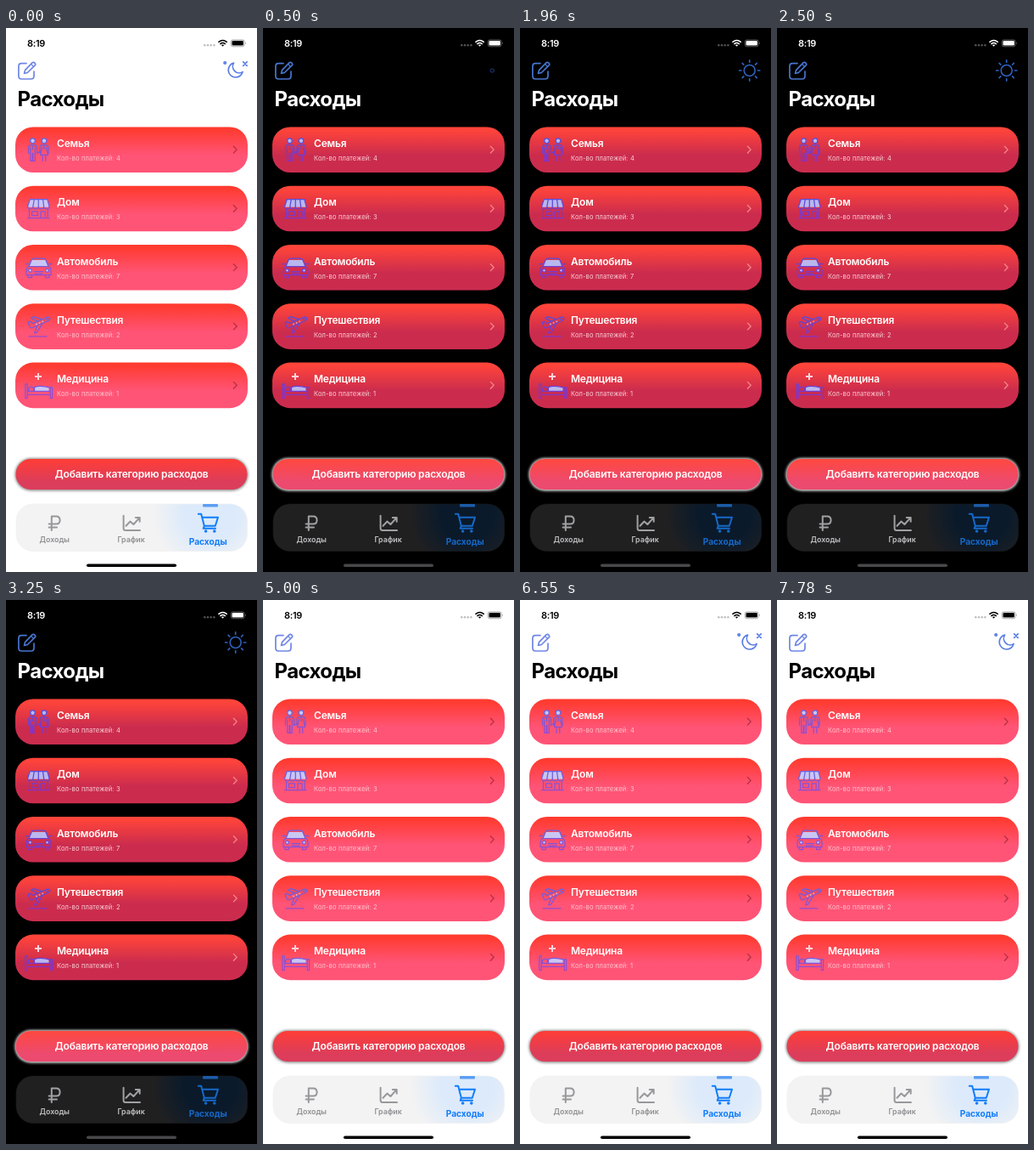
Recreate the animation shown at these times as an HTML page. Size 296x640 px, loop 7.84 s.

```html
<!DOCTYPE html>
<html lang="ru">
<head>
<meta charset="utf-8">
<title>Расходы</title>
<style>
html, body { margin: 0; width: 100%; height: 100%; overflow: hidden; }
svg { display: block; width: 296px; height: 640px; font-family: Inter, "Noto Sans", sans-serif; }
.light {
  --bg: #fff; --fg: #000; --faint: #bdbdbf; --home: #000; --edit: #6f86e6;
  --top: #ff3b30; --low: #ff5476; --chev: #b52f49; --sub: #ffc4cc;
  --btnTop: #ff3d36; --btnLow: #dc3d5b; --glow: #8d8d8d;
  --barA: #f3f3f3; --barB: #dceafb; --edge: #eeeef0; --tab: #98989c; --label: #8f8f93;
  --active: #117dfb; --mark: #5c9ef3;
  --inkA: #5867e8; --inkB: #9a48cf; --pale: #c9c6f4; --tone: #5a7ee6;
}
.dark {
  --bg: #000; --fg: #fff; --faint: #555558; --home: #48484b; --edit: #4776cf;
  --top: #ff443a; --low: #cb2c4e; --chev: #f6858d; --sub: #fbd0d6;
  --btnTop: #ff483f; --btnLow: #ec4a6f; --glow: #e9e9e9;
  --barA: #202021; --barB: #0a1a2b; --edge: #1c1c1e; --tab: #a1a1a4; --label: #c2c2c5;
  --active: #1668c8; --mark: #1c5ca8;
  --inkA: #4b50e4; --inkB: #8b2fc4; --pale: #b9b7ee; --tone: #2f60bd;
}
.fg { fill: var(--fg); }
.line { fill: none; stroke-linecap: round; stroke-linejoin: round; }
.ink { stroke: url(#ink); stroke-width: 1.25; }
.pale { fill: var(--pale); }
.name { font-size: 12px; font-weight: 600; letter-spacing: -.2px; fill: #fff; }
.sub { font-size: 7.5px; letter-spacing: .15px; fill: var(--sub); }
.tab { font-size: 8.8px; font-weight: 600; fill: var(--label); text-anchor: middle; }
.tone { stroke: var(--tone); stroke-width: 1.7; }
</style>
</head>
<body>
<svg id="stage" class="light" viewBox="0 0 296 640">
  <defs>
    <linearGradient id="card" x2="0" y2="1">
      <stop offset=".06" style="stop-color:var(--top)"/>
      <stop offset=".62" style="stop-color:var(--low)"/>
    </linearGradient>
    <linearGradient id="btn" x2="0" y2="1">
      <stop offset="0" style="stop-color:var(--btnTop)"/>
      <stop offset=".75" style="stop-color:var(--btnLow)"/>
    </linearGradient>
    <linearGradient id="ink" gradientUnits="userSpaceOnUse" x1="0" y1="12" x2="0" y2="42">
      <stop offset="0" style="stop-color:var(--inkA)"/>
      <stop offset="1" style="stop-color:var(--inkB)"/>
    </linearGradient>
    <radialGradient id="bar" gradientUnits="userSpaceOnUse" cx="241" cy="572" r="68">
      <stop offset="0" style="stop-color:var(--barB)"/>
      <stop offset=".45" style="stop-color:var(--barB)"/>
      <stop offset="1" style="stop-color:var(--barA)"/>
    </radialGradient>
    <filter id="blur" x="-10%" y="-40%" width="120%" height="180%">
      <feGaussianBlur stdDeviation="1.8"/>
    </filter>
  </defs>

  <rect width="296" height="640" style="fill:var(--bg)"/>

  <g class="fg">
    <text x="25" y="21.8" font-size="11" font-weight="600" letter-spacing="-.3">8:19</text>
    <g id="dots" style="fill:var(--faint)"></g>
    <path class="line" d="M251 16.4Q255.6 12.6 260.2 16.4M252.9 18.6Q255.6 16.5 258.3 18.6"
      style="stroke:var(--fg)" stroke-width="1.6" stroke-linecap="butt"/>
    <path d="M253.9 20Q255.6 18.8 257.3 20L255.6 21.8Z"/>
    <rect x="265.3" y="13.9" width="15.8" height="7.9" rx="2.4" fill="none" stroke-width=".7"
      style="stroke:var(--fg)" opacity=".5"/>
    <rect x="266.5" y="15.1" width="13.4" height="5.5" rx="1.4"/>
    <path d="M282 16.5Q283.4 17.8 282 19.2Z" opacity=".5"/>
  </g>

  <g class="line" style="stroke:var(--edit)" stroke-width="1.7">
    <path d="M24 41.6H18.2Q14.9 41.6 14.9 45V56.6Q14.9 60 18.2 60H29.6Q33 60 33 56.6V51"/>
    <path d="M21.5 53.5L22.5 49.6L31.2 40.7Q32.4 39.7 33.9 41.1Q35.3 42.6 34.2 43.8L25.4 52.5Z"/>
    <path d="M29.6 42.5L32.5 45.4" stroke-width="1.2"/>
  </g>
  <text class="fg" x="13.5" y="91.8" font-size="24" font-weight="700" letter-spacing="-.6">Расходы</text>

  <g id="sun" class="line tone"></g>
  <g id="moon" class="line tone">
    <path id="crescent" d="M268.6 41.1A8.6 8.6 0 1 0 279.1 51.6A7.6 7.6 0 0 1 268.6 41.1Z"/>
    <circle id="dot" cx="258.2" cy="41" r="1.2"/>
    <path id="cross" d="M279.7 39.9L284.2 44.3M284.2 39.9L279.7 44.3"/>
  </g>

  <g id="cards"></g>

  <rect x="10.5" y="506" width="275" height="38.5" rx="19" style="fill:var(--glow)" filter="url(#blur)"/>
  <rect x="11.5" y="507" width="273" height="36" rx="18" fill="url(#btn)"/>
  <text class="name" x="148" y="529.2" text-anchor="middle" style="letter-spacing:-.18px">Добавить категорию расходов</text>

  <rect x="12" y="560" width="272.5" height="55.5" rx="20" fill="url(#bar)" style="stroke:var(--edge)" stroke-width=".6"/>
  <rect x="232" y="560" width="18" height="3.4" rx="1" style="fill:var(--mark)"/>
  <g class="line" style="stroke:var(--tab)" stroke-width="2">
    <path d="M53.8 591V574.4H59.2Q63.6 574.4 63.6 579Q63.6 583.6 59.2 583.6H50.6M50.6 587.4H60"/>
    <path d="M138.6 573.8V588.4Q138.6 590.9 141 590.9H158M141.5 585.7L146.5 580.5L150.4 584L157.2 576.4M152.8 575.9H157.7V580.8"/>
  </g>
  <g class="line" style="stroke:var(--active)" stroke-width="2">
    <path d="M226.8 571.8H230.2L233.8 585.8H246.8L250 575.8H231.3M233.8 585.8L232.7 588.8H247"/>
    <g style="fill:var(--active)" stroke="none">
      <circle cx="235.6" cy="592" r="1.8"/><circle cx="245.8" cy="592" r="1.8"/>
    </g>
  </g>
  <text class="tab" x="57.3" y="605.2">Доходы</text>
  <text class="tab" x="147.6" y="605.2">График</text>
  <text class="tab" x="238.2" y="607.8" style="fill:var(--active);font-size:10.2px;font-weight:700">Расходы</text>
  <rect x="95" y="630.4" width="106" height="3.6" rx="1.8" style="fill:var(--home)"/>
</svg>

<script>
const LOOP = 7840, DARK_AT = 500, LIGHT_AT = 5000;
const $ = id => document.getElementById(id);
const range = n => [...Array(n).keys()];

// Icons are drawn from the left edge and top of their card.
const person = (x, skirt) => `
  <circle class="pale" cx="${x}" cy="16.3" r="2.8"/>
  <path d="M${x - 5} 31V25Q${x - 5} 21.2 ${x - 2} 21.2H${x + 2}Q${x + 5} 21.2 ${x + 5} 25V31
    M${x} 21.5V26
    ${skirt ? `M${x - 2.5} 24L${x - 4.5} 33H${x + 4.5}L${x + 2.5} 24M${x - 1.8} 33V40M${x + 1.8} 33V40`
            : `M${x - 2.8} 24.5V40H${x - .4}V31H${x + .4}V40H${x + 2.8}V24.5`}"/>`;

const icons = {
  family: person(31.5, false) + person(45, true) + '<path d="M36.5 31L40 29"/>',
  shop: `
    <path class="pale" stroke="none" d="M28 16H49L51 25H25.5Z"/>
    <path d="M28.2 16H48.8L51 24Q51 27.2 47.8 27.2T44.6 24Q44.6 27.2 41.4 27.2T38.2 24Q38.2 27.2 35 27.2T31.9 24
      Q31.9 27.2 28.8 27.2T25.6 24ZM33.3 16L31.9 24M38.3 16V24M43.5 16L44.6 24
      M27.5 27.5V38H49.2V27.5M30.5 30.2H37.5V35H30.5ZM41 38V30.2H46.2V38M25.5 38H51"/>`,
  car: `
    <path class="pale" stroke="none" d="M30.5 18H46.5L49.5 25H27.5Z"/>
    <path d="M27 25.5L30 18Q30.8 16 33 16H44Q46.2 16 47 18L50 25.5M26.5 25.5H50.5Q53 27 53 30V35.5H24V30Q24 27 26.5 25.5Z
      M26 35.5V38.5H30.5V35.5M46.5 35.5V38.5H51V35.5M33.5 31.5H43.5M34 34H43M23 22.5H26.5M50.5 22.5H54"/>
    <circle class="pale" cx="28.5" cy="30.2" r="1.9"/><circle class="pale" cx="48.5" cy="30.2" r="1.9"/>`,
  plane: `
    <path d="M26 22L28.5 21L31.5 23.3L47.2 16.4Q50.8 15.2 51.8 17.2Q52 19 49 20.5L30.8 28.5Q28.8 28.8 28 27Z
      M37.2 20.8L29.5 17L32.5 15.4L42.5 18.4M43.2 23.2L36.5 33.8L33.6 34.6L36.8 26
      M47.5 18.6L49 18M27 38.7H48"/>
    <g class="pale" stroke="none"><circle cx="36" cy="24.2" r=".9"/><circle cx="39.6" cy="22.6" r=".9"/><circle cx="43.2" cy="21" r=".9"/></g>`,
  bed: `
    <path d="M38 12.3V20.3M34 16.3H42" style="stroke:#ffd3dc" stroke-width="2" stroke-linecap="butt"/>
    <path class="pale" stroke="none" d="M33.5 29Q40 26.5 50.5 29V33.8H33.5Z"/>
    <path d="M22.8 42V25.2H25.2V42ZM25.2 33.8H52.3M25.2 37.8H52.3M52.3 42V29.2H54.6V42Z
      M33.5 33.6V29Q40 26.5 52 29.5M26.5 33.5Q26 28.6 29.5 28.6T32.8 33.5"/>`
};

const rows = [['family', 'Семья', 4], ['shop', 'Дом', 3], ['car', 'Автомобиль', 7],
  ['plane', 'Путешествия', 2], ['bed', 'Медицина', 1]];

$('cards').innerHTML = rows.map(([icon, name, count], i) => `
  <g transform="translate(0 ${116.4 + i * 69.3})">
    <rect x="11" width="274" height="53.6" rx="21" fill="url(#card)"/>
    <g class="line ink">${icons[icon]}</g>
    <text class="name" x="60" y="23.8">${name}</text>
    <text class="sub" x="60" y="39.6">Кол-во платежей: ${count}</text>
    <path class="line" d="M268.4 22.8L272.2 26.7L268.4 30.6" style="stroke:var(--chev)" stroke-width="1.3"/>
  </g>`).join('');

$('dots').innerHTML = range(4).map(i => `<circle cx="${234.3 + i * 3.7}" cy="20.3" r="1.2"/>`).join('');

const clamp = v => Math.max(0, Math.min(1, v));
const phase = (t, start, length) => clamp((t - start) / length);
const easeOut = p => 1 - (1 - p) ** 3;
const pop = p => p <= 0 ? 0 : 1 + 2.2 * (p - 1) ** 3 + 1.2 * (p - 1) ** 2;

function scaleAt(el, x, y, s, turn = 0) {
  el.setAttribute('transform', `translate(${x} ${y}) rotate(${turn}) scale(${s}) translate(${-x} ${-y})`);
  el.setAttribute('visibility', s > 0.01 ? 'visible' : 'hidden');
}

function drawSun(t) {
  const grow = easeOut(phase(t, 0, 700));
  const ray = easeOut(phase(t, 330, 600));
  const rays = ray > 0 ? range(8).map(i => {
    const a = i * Math.PI / 4 - (1 - ray) * 0.6;
    const point = r => `${270.7 + r * Math.cos(a)} ${50 + r * Math.sin(a)}`;
    return `M${point(9.8)}L${point(9.8 + 2.3 * ray)}`;
  }).join('') : '';
  $('sun').innerHTML = `<circle cx="${270.3 + .4 * grow}" cy="50" r="${2.1 + 4.4 * grow}"
    stroke-width="${1 + .6 * grow}" opacity="${.55 + .45 * grow}"/><path d="${rays}" opacity="${ray}"/>`;
}

function drawMoon(t) {
  const grow = easeOut(phase(t, 60, 700));
  scaleAt($('crescent'), 270.5, 49.8, grow, -50 * (1 - grow));
  scaleAt($('dot'), 258.2, 41, pop(phase(t, 550, 400)));
  scaleAt($('cross'), 282, 42.1, pop(phase(t, 700, 450)));
}

function render(t) {
  const dark = t >= DARK_AT && t < LIGHT_AT;
  $('stage').setAttribute('class', dark ? 'dark' : 'light');
  $('sun').style.display = dark ? '' : 'none';
  $('moon').style.display = dark ? 'none' : '';
  if (dark) drawSun(t - DARK_AT);
  else drawMoon(t < DARK_AT ? LOOP : t - LIGHT_AT);
}

const start = performance.now();
function tick() {
  render((performance.now() - start) % LOOP);
  requestAnimationFrame(tick);
}
tick();
</script>
</body>
</html>
```
